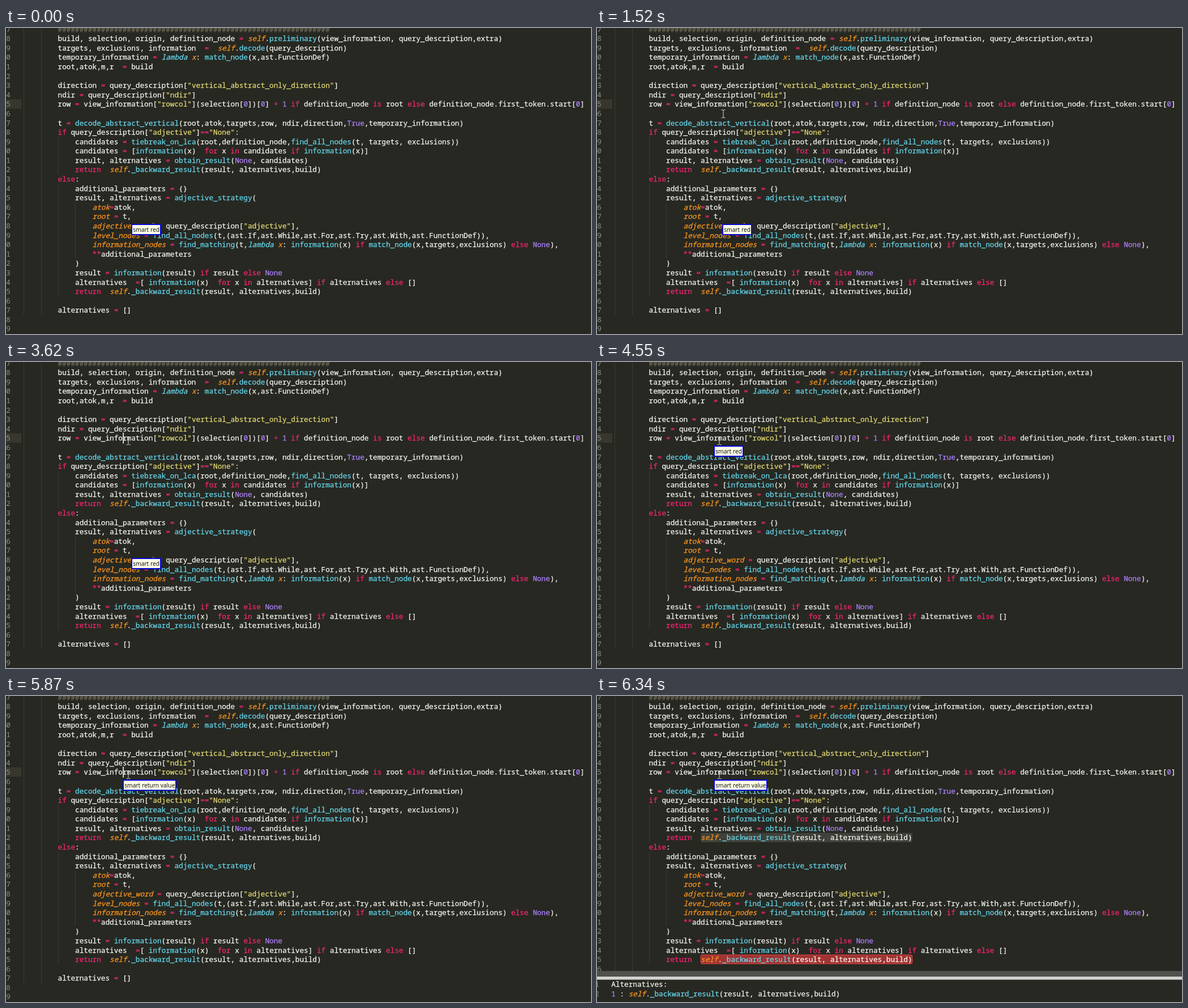
An HTML page for the animation above (8 s loop, 1033 by 542 pixels).

```html
<!DOCTYPE html>
<html lang="en">
<head>
<meta charset="utf-8">
<title>Code editor</title>
<style>
  html, body { margin: 0; width: 100%; height: 100%; overflow: hidden; background: #272822; }
  svg { display: block; width: 100%; height: 100%; }
  text { white-space: pre; font-kerning: none; font-variant-ligatures: none; }
  text, tspan { fill: currentColor; }
  .code, .code tspan { stroke: currentColor; stroke-width: .25px; }
  .code { font: 12.71px "Noto Sans Mono", "DejaVu Sans Mono", monospace; color: #f8f8f2; }
  .tip { font: 10.3px "Open Sans", "Noto Sans", sans-serif; color: #000; }
  .num { color: #90908a; stroke: none; }
  .key { color: #f92672; }
  .fn { color: #66d9ef; }
  .lam { color: #66d9ef; font-style: italic; }
  .arg { color: #fd971f; font-style: italic; }
  .str { color: #e6db74; }
  .lit { color: #ae81ff; }
  .rem { color: #75715e; }
</style>
</head>
<body>
<svg id="stage" viewBox="0 0 1033 542"></svg>
<script>
const LOOP = 8000, CHAR = 7.626, PITCH = 16.59, TOP = 10.2, LEFT = 91.6;

const CODE = `build, selection, origin, definition_node = self.preliminary(view_information, query_description,extra)
targets, exclusions, information  =  self.decode(query_description)
temporary_information = lambda x: match_node(x,ast.FunctionDef)
root,atok,m,r  = build

direction = query_description["vertical_abstract_only_direction"]
ndir = query_description["ndir"]
row = view_information["rowcol"](selection[0])[0] + 1 if definition_node is root else definition_node.first_token.start[0]

t = decode_abstract_vertical(root,atok,targets,row, ndir,direction,True,temporary_information)
if query_description["adjective"]=="None":
    candidates = tiebreak_on_lca(root,definition_node,find_all_nodes(t, targets, exclusions))
    candidates = [information(x)  for x in candidates if information(x)]
    result, alternatives = obtain_result(None, candidates)
    return  self._backward_result(result, alternatives,build)
else:
    additional_parameters = {}
    result, alternatives = adjective_strategy(
        atok=atok,
        root = t,
        adjective_word = query_description["adjective"],
        level_nodes = find_all_nodes(t,(ast.If,ast.While,ast.For,ast.Try,ast.With,ast.FunctionDef)),
        information_nodes = find_matching(t,lambda x: information(x) if match_node(x,targets,exclusions) else None),
        **additional_parameters
    )
    result = information(result) if result else None
    alternatives  =[ information(x)  for x in alternatives] if alternatives else []
    return  self._backward_result(result, alternatives,build)

alternatives = []

`.split("\n");

const RULES = [
  ["rem", "#+"],
  ["str", "\"[^\"]*\""],
  ["arg", "(?<=^ {8})\\w+|\\bself\\b|(?<=lambda )x"],
  ["lam", "\\blambda\\b"],
  ["key", "\\b(?:if|else|for|in|is|return)\\b|==|\\*\\*|[=+]"],
  ["lit", "\\b(?:None|True|\\d+)\\b"],
  ["fn", "\\b\\w+(?=\\()"],
];
const TOKEN = new RegExp(RULES.map(([name, re]) => `(?<${name}>${re})`).join("|"), "g");

// Each row holds until the next one begins.
const POINTER = [
  [370, 827, 484], [440, 665, 392], [510, 512, 306.5],
  [830, 410, 259], [910, 305.5, 211.5],
  [1220, 290, 199], [1300, 268, 183], [1370, 250, 171], [1450, 234, 160], [1520, 223, 152],
  [1600, 217, 146], [1680, 213, 141], [1760, 211.5, 138], [1840, 211, 136.5],
  [2960, 213, 138], [3010, 215.5, 139], [3340, 216, 139.5],
];
const CARET = [
  [2500, 1], [2960, .6], [3010, .3], [3160, 0], [3540, .5], [3620, 1],
  [4020, .6], [4100, .3], [4180, 0], [4720, .5], [4860, .8], [5010, 1],
  [5160, .5], [5240, 0], [5700, .4], [5780, .7], [5870, 1], [6110, 0],
];

const stage = document.getElementById("stage");

function add(tag, attrs, parent = stage) {
  const el = document.createElementNS("http://www.w3.org/2000/svg", tag);
  for (const k in attrs) el.setAttribute(k, attrs[k]);
  return parent.appendChild(el);
}
const box = (x, y, width, height, fill, parent, more) =>
  add("rect", { x, y, width, height, fill, ...more }, parent);

function write(str, x, y, cls, parent) {
  const el = add("text", { x, y, class: cls }, parent);
  el.textContent = str;
  return el;
}
function writeCode(line, x, y, parent) {
  const el = add("text", { x, y, class: "code" }, parent);
  let last = 0;
  for (const m of line.matchAll(TOKEN)) {
    el.append(line.slice(last, m.index));
    const cls = Object.keys(m.groups).find(k => m.groups[k] !== undefined);
    add("tspan", { class: cls }, el).textContent = m[0];
    last = m.index + m[0].length;
  }
  el.append(line.slice(last));
}

const rowTop = i => TOP + i * PITCH;
const baseline = i => rowTop(i) + 13;
const guide = (x, from, to) => box(x, from, 1, to - from, "#3a3b34");

// Backgrounds
const rowMark = box(0, rowTop(7), 27, PITCH, "#38372d");
guide(31, 0, 508);
guide(62, 0, 508);
guide(92, rowTop(11), rowTop(15));
guide(92, rowTop(16), rowTop(28));
guide(122, rowTop(18), rowTop(24));

const callX = LEFT + 12 * CHAR, callW = 49 * CHAR;
const picked = add("g");
box(callX, rowTop(14), callW, PITCH, "#40413a", picked, { rx: 2 });
box(callX + 29.5 * CHAR - .5, rowTop(14) + 8.5, 1.2, 1.2, "#85857b", picked);
const other = add("g");
box(callX, rowTop(27) + .3, callW, PITCH - .6, "#a03432", other, { rx: 2.5, stroke: "#dc4541" });

// Text
writeCode("#".repeat(63), LEFT, baseline(-1));
for (let i = -1; i < 32; i++) write((18 + i) % 10, .2, baseline(i), "code num");
CODE.forEach((line, i) => writeCode(line, LEFT, baseline(i)));

// Output panel
const panel = add("g");
box(0, 487, 1033, 55, "#272822", panel);
box(0, 487, 1033, 10, "#50514c", panel);
box(0, 497, 1033, 5.5, "#d2d2d0", panel);
write("1", -3.5, 515.4, "code num", panel);
write("2", -3.5, 532, "code num", panel);
writeCode("Alternatives:", 25.2, 515.4, panel);
writeCode("1 : self._backward_result(result, alternatives,build)", 25.2, 532, panel);

const caret = box(206.3, 125, 1.6, 19.5, "#f8f8f0");

function tooltip(x, y, w, label) {
  const g = add("g", { transform: `translate(${x} ${y})` });
  box(1, 1, w - 2, 18, "#ffffe8", g, { stroke: "#0a0ad8", "stroke-width": 2 });
  write(label, 3.2, 13.6, "tip", g);
  return g;
}
const tips = [
  [0, 4550, tooltip(221, 347, 53, "smart red")],
  [4550, 4860, tooltip(206, 148, 53, "smart red")],
  [5700, LOOP, tooltip(206, 148, 95, "smart return value")],
];

const click = add("circle", { cx: 208.5, cy: 135.5, r: 11, fill: "#f0e000", opacity: .6 });
const pointer = add("path", {
  d: "M-3.5-7H-1L0-6L1-7H3.5M0-6V6M-3.5 7H-1L0 6L1 7H3.5",
  fill: "none", stroke: "#d8d8d0",
});

const show = (el, on) => el.setAttribute("visibility", on ? "visible" : "hidden");
const at = (table, t) => table.filter(row => row[0] <= t).pop();

function draw(t) {
  const p = at(POINTER, t), c = at(CARET, t);
  show(pointer, p);
  if (p) pointer.setAttribute("transform", `translate(${p[1]} ${p[2]})`);
  caret.setAttribute("opacity", c ? c[1] : 0);
  show(click, t >= 2290 && t < 2500);
  for (const [from, to, el] of tips) show(el, t >= from && t < to);
  show(rowMark, t < 6110);
  show(panel, t >= 6110);
  show(other, t >= 6110);
  show(picked, t >= 6340);
}

const start = performance.now();
function tick() {
  draw((performance.now() - start) % LOOP);
  requestAnimationFrame(tick);
}
tick();
</script>
</body>
</html>
```
